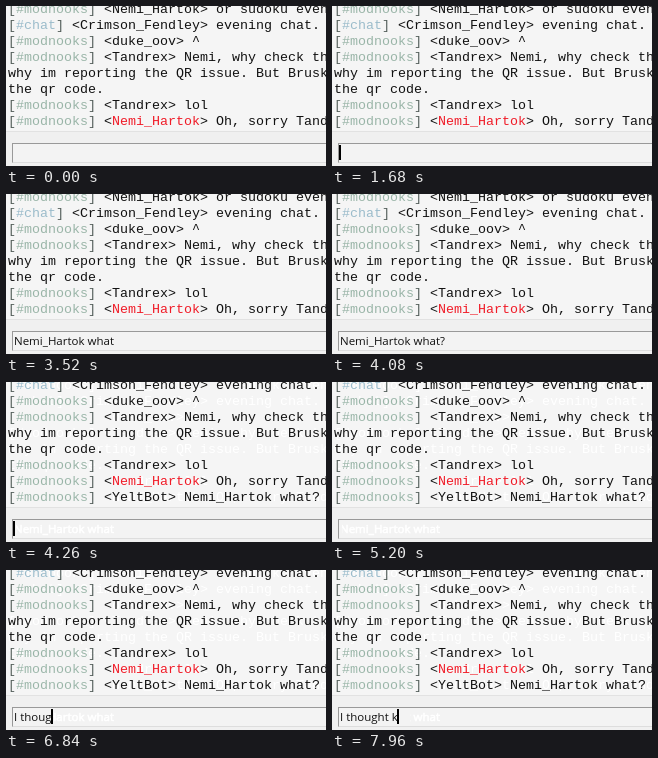
Write an HTML page that moves like this. It is 320x160 px and loops after 8 s.

```html
<!DOCTYPE html>
<html lang="en">
<head>
<meta charset="utf-8">
<title>Chat window</title>
<style>
  html, body { margin: 0; width: 100%; height: 100%; overflow: hidden; background: #f0f0f0; }
  #stage { position: relative; width: 320px; height: 160px; overflow: hidden; white-space: pre; }
  #log { position: absolute; inset: 0 0 auto; height: 125px; overflow: hidden; background: #f5f5f5; border-bottom: 1px solid #e2e2e2; }
  .page { position: absolute; left: 2px; top: -4px; font: 13.333px/16px "Liberation Mono", "Courier New", monospace; color: #111; }
  .page div { height: 16px; }
  .tag { color: #55605c; }
  .room { color: #9ab5a8; }
  .chat { color: #9bbccb; }
  .hot { color: #f01c28; }
  .ghost, .ghost * { color: #fff; }
  #field { position: absolute; left: 6px; top: 137px; width: 330px; height: 18px; background: #f3f3f3; border: 1px solid #999; border-bottom-color: #ddd; }
  #field div { position: absolute; left: 1px; top: 1px; font: 11.5px/16px "Open Sans", "Noto Sans", sans-serif; color: #111; }
  #field .ghost { color: #fff; -webkit-text-stroke: .6px #fff; }
  #caret { position: absolute; top: 1px; width: 2px; height: 15px; background: #000; }
</style>
</head>
<body>
<div id="stage">
  <div id="log"></div>
  <div id="field"><div id="old" class="ghost"></div><div id="typed"></div><i id="caret"></i></div>
</div>
<script>
const LOOP = 8000, SENT = 4260;
const nick = "Nemi_Hartok";
const $ = id => document.getElementById(id);

const tag = name => `<span class="tag">[<span class="${name === "chat" ? "chat" : "room"}">#${name}</span>]</span> `;
const line = (who, text, hot, room = "modnooks") =>
  `<div>${tag(room)}&lt;<span class="${hot ? "hot" : ""}">${who}</span>&gt; ${text}</div>`;

const rows = [
  line(nick, "or sudoku even"),
  line("Crimson_Fendley", "evening chat.", false, "chat"),
  line("duke_oov", "^"),
  line("Tandrex", "Nemi, why check th"),
  "<div>why im reporting the QR issue. But Brusk</div>",
  "<div>the qr code.</div>",
  line("Tandrex", "lol"),
  line(nick, "Oh, sorry Tand", true),
  line("YeltBot", nick + " what?")
];

function addPage(from, cls = "") {
  const page = document.createElement("div");
  page.className = "page " + cls;
  page.innerHTML = rows.slice(from, from + 8).join("");
  $("log").append(page);
  return page;
}
const before = addPage(0);
const shade = addPage(0, "ghost");
const after = addPage(1);

// time, text in the field, caret shown
const first = nick + " ";
const steps = [
  [0, "", 0], [720, "", 1], [900, "", 0], [1140, "", 1], [1320, "", 0],
  [1680, "", 1], [1780, "N", 1], [1860, "Ne", 1], [1940, "Nem", 1],
  [2060, nick, 1], [2240, first, 1], [2420, first, 0],
  [2780, first + "w", 1], [2960, first + "w", 0],
  [3280, first + "w", 1], [3320, first + "wh", 1], [3360, first + "wha", 1],
  [3420, first + "what", 1], [3520, first + "what", 0],
  [3880, first + "what", 1], [3980, first + "what?", 1], [4080, first + "what?", 0],
  [SENT, "", 1], [4640, "", 0], [5020, "", 1], [5200, "", 0], [5600, "", 1], [5780, "", 0],
  [6160, "I", 0], [6320, "I ", 1], [6360, "I t", 1], [6420, "I t", 0],
  [6700, "I t", 1], [6740, "I th", 1], [6780, "I tho", 1], [6820, "I thou", 1],
  [6840, "I thoug", 1], [6860, "I though", 1], [6920, "I thought", 1],
  [6980, "I thought ", 1], [7080, "I thought k", 1], [7180, "I thought kn", 1],
  [7340, "I thought kn", 0], [7560, "I thought kn", 1], [7700, "I thought kn", 0],
  [7780, "I thought kn", 1], [7960, "I thought k", 1]
];

$("old").textContent = first + "what";
let shown = -1;

function draw(now) {
  const t = now % LOOP;
  const at = steps.findLastIndex(s => s[0] <= t);
  if (at !== shown) {
    shown = at;
    const [time, text, caret] = steps[at];
    const sent = time >= SENT;
    before.hidden = sent;
    shade.hidden = after.hidden = !sent;
    $("typed").textContent = text;
    const width = $("typed").getBoundingClientRect().width;
    $("caret").style.left = Math.round(width) + "px";
    $("caret").hidden = !caret;
    // typing wipes the pale remains of the sent message
    const wiped = time >= 7180 ? 70 : width + 2;
    $("old").hidden = !sent;
    $("old").style.clipPath = `inset(0 0 0 ${wiped}px)`;
  }
  requestAnimationFrame(draw);
}
requestAnimationFrame(draw);
</script>
</body>
</html>
```
